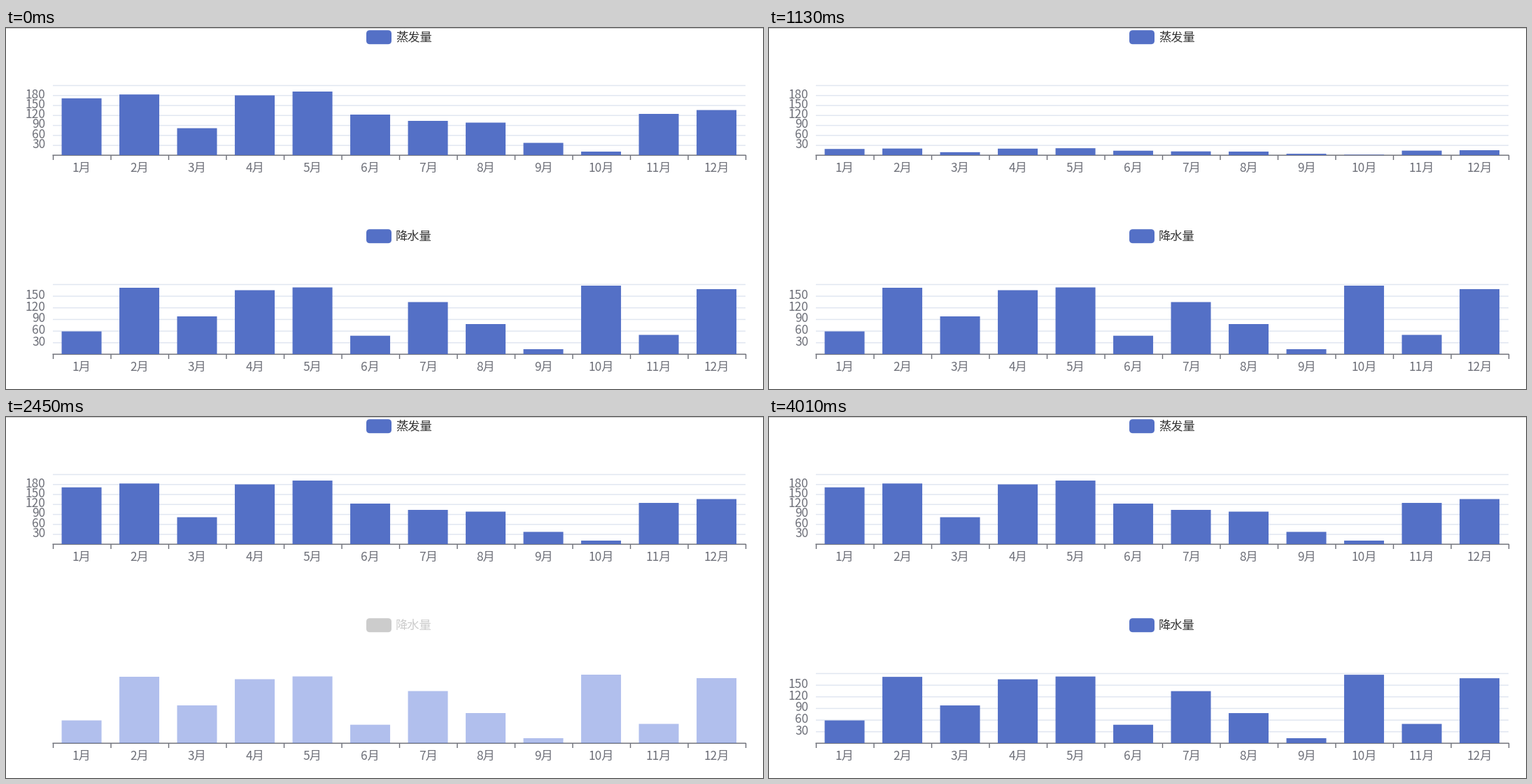
Animation of 1082 by 517 pixels, one loop 4050 ms. Source, as a matplotlib script:

```python
import numpy as np
import matplotlib.pyplot as plt
from matplotlib.animation import FuncAnimation
from matplotlib.patches import FancyBboxPatch, Rectangle

W, H, DPI = 1082, 517, 100
LOOP, STEP = 4050, 30
LEFT, RIGHT, MONTHS = 67, 1057, 12
PITCH = (RIGHT - LEFT) / MONTHS
BAR_W, LINE_W = 57, 1.44
FONT = 17.3 * 72 / DPI

BLUE, LIT, OFF = "#5470c6", "#5c7bda", "#cccccc"
AXIS, SPLIT, INK = "#6e7079", "#e0e6f1", "#333333"

plt.rcParams["font.family"] = "Noto Sans CJK JP"
fig = plt.figure(figsize=(W / DPI, H / DPI), dpi=DPI, facecolor="white")
ax = fig.add_axes([0, 0, 1, 1])
ax.set_xlim(0, W)
ax.set_ylim(H, 0)
ax.axis("off")


def rect(x, y, w, h, color, z):
    patch = Rectangle((x, y), w, h, facecolor=color, linewidth=0, zorder=z, snap=False)
    return ax.add_patch(patch)


def label(x, y, text, color, align):
    return ax.text(x, y, text, color=color, fontsize=FONT, ha=align, va="baseline")


class BarChart:
    """A bar chart whose legend switches its only series off and on."""

    def __init__(self, name, top, peak, labelled, tops, hide, show, fade, growth, hover=None):
        self.base = top + 179
        self.heights = self.base - np.array(tops)
        self.hide, self.show = hide, show
        self.hover = hide if hover is None else hover
        self.fade, self.growth = fade, growth

        self.icon = ax.add_patch(FancyBboxPatch(
            (515, top + 0.2), 36, 20, boxstyle="round,pad=0,rounding_size=5",
            facecolor=BLUE, linewidth=0))
        self.name = label(557, top + 15.5, name, INK, "left")

        self.scale = []
        for value in range(30, peak + 1, 30):
            y = self.base - 100 * value / peak
            self.scale.append(rect(LEFT, y - 0.3, RIGHT - LEFT, LINE_W, SPLIT, 1))
            if value <= labelled:
                self.scale.append(label(56.5, y + 4.3, str(value), AXIS, "right"))

        rect(LEFT - 0.5, self.base - 0.5, RIGHT - LEFT + 1.2, LINE_W, AXIS, 2)
        for i in range(MONTHS + 1):
            rect(LEFT - 0.2 + i * PITCH, self.base, LINE_W, 7, AXIS, 2)
        self.bars = []
        for i, height in enumerate(self.heights):
            mid = LEFT + (i + 0.5) * PITCH
            label(mid, self.base + 24.3, f"{i + 1}月", AXIS, "center")
            self.bars.append(rect(mid - BAR_W / 2 - 0.2, self.base, BAR_W, -height, BLUE, 3))

    def grown(self, t):
        """Bar height share, eased in and out, refreshed every 100 ms."""
        if t < self.show:
            return 1
        p = np.interp(self.show + (t - self.show) // 100 * 100, *self.growth)
        return 4 * p ** 3 if p < 0.5 else 1 - 4 * (1 - p) ** 3

    def opacity(self, t):
        if not self.hide <= t < self.show:
            return 1
        p = self.fade + 0.36 * ((t - self.hide) // 100)
        return max(0, 1 - p) ** 3

    def update(self, t):
        on = not self.hide <= t < self.show
        self.icon.set_facecolor(BLUE if on else OFF)
        self.name.set_color(INK if on else OFF)
        for part in self.scale:
            part.set_visible(on)
        color = LIT if self.hover <= t < self.show and self.hover < self.hide else BLUE
        share, alpha = self.grown(t), self.opacity(t)
        for bar, height in zip(self.bars, self.heights):
            bar.set_height(-height * share)
            bar.set_facecolor(color)
            bar.set_alpha(alpha)


rect(0, 0, W, 1, "#c8c8c8", 1)
charts = [
    BarChart("蒸发量", 3, 210, 180,
             [100.7, 95.2, 143.5, 96.5, 91, 124, 133, 135.5, 164.5, 177, 123, 117.5],
             hide=380, show=730, fade=0.045,
             growth=([730, 2030], [0.01, 0.9525])),
    BarChart("降水量", 288, 180, 150,
             [434.5, 372, 413, 375.5, 371.5, 440.7, 392.5, 424, 460, 369, 439.5, 374],
             hide=2450, show=2710, fade=0.217, hover=2230,
             growth=([2710, 3410, 3510, 4010], [0.025, 0.515, 0.55, 0.93])),
]


def draw(frame):
    # Sample late in the slot so that 10 ms switch times are never missed.
    t = frame * STEP + 20
    for chart in charts:
        chart.update(t)
    return []


anim = FuncAnimation(fig, draw, frames=LOOP // STEP, interval=STEP,
                     init_func=lambda: draw(0), repeat=True, repeat_delay=0, blit=False)
plt.show()
```
